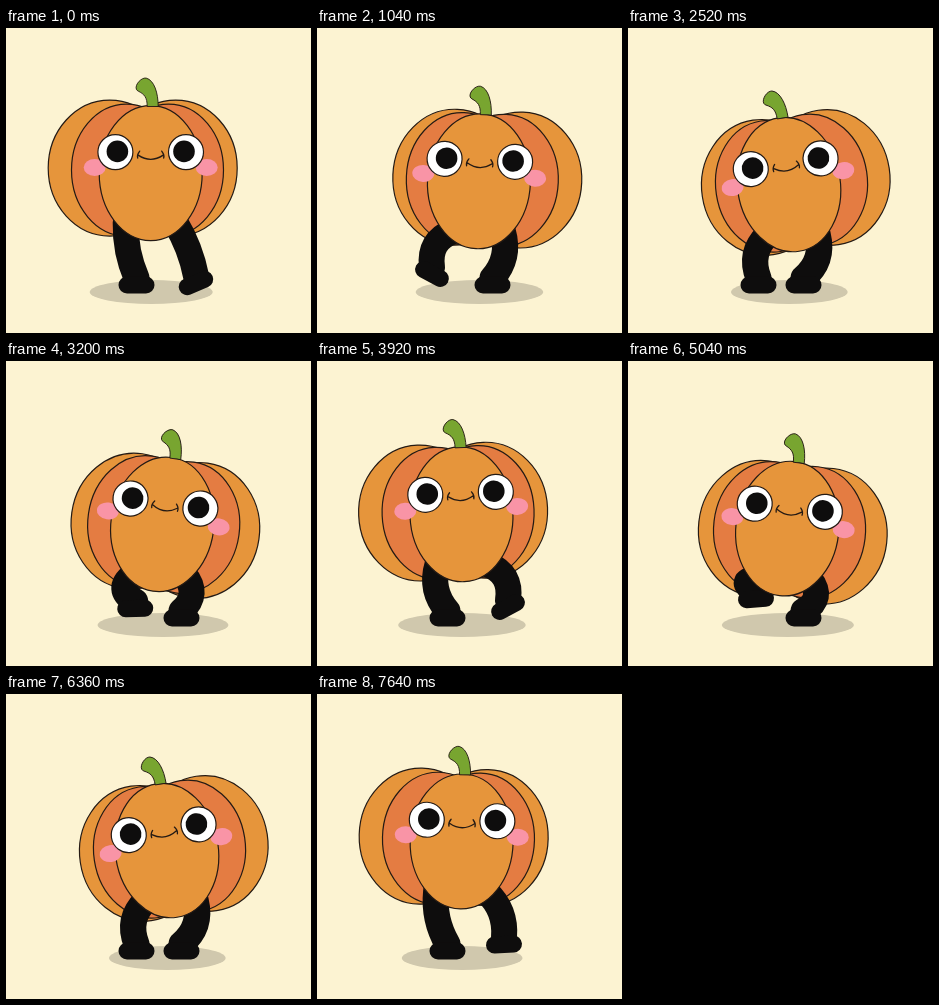
Animation of 305x305 px, one loop 7.68 s. Source, as an HTML page with a canvas:

```html
<!DOCTYPE html>
<html>
<head>
<meta charset="utf-8">
<title>Dancing pumpkin</title>
<style>
html, body { margin: 0; width: 100%; height: 100%; overflow: hidden; background: #fcf3d2; }
canvas { display: block; width: 305px; height: 305px; }
</style>
</head>
<body>
<canvas id="stage" width="305" height="305"></canvas>
<script>
const ctx = document.getElementById('stage').getContext('2d');
const STEP = 960, CYCLE = 2 * STEP, TAU = 2 * Math.PI, RAD = Math.PI / 180;
const INK = '#241a14', ORANGE = '#e6953b', RUST = '#e47c42';

// Side-to-side position over one step: -1 is left, 1 is right
const SWAY = [[0, -1], [90, -1.03], [720, 1.1], [960, 1]];
// Right foot over the cycle: time, x, y, rotation in degrees
const FOOT = [
  [0, 190, 255, -23], [80, 191, 246, -28], [240, 178, 238, 4], [400, 175.5, 257, 0],
  [1560, 175.5, 257, 0], [1720, 182, 249, 0], [1880, 187, 250.5, -3], [1920, 190, 255, -23]
];

function pose(keys, t) {
  let i = 1;
  while (i < keys.length - 1 && t > keys[i][0]) i++;
  const a = keys[i - 1], b = keys[i];
  const u = (t - a[0]) / (b[0] - a[0]);
  const e = u * u * (3 - 2 * u);
  return a.slice(1).map((v, k) => v + (b[k + 1] - v) * e);
}

function paint(fill, line = 1.2) {
  if (fill) {
    ctx.fillStyle = fill;
    ctx.fill();
  }
  if (line) {
    ctx.strokeStyle = INK;
    ctx.lineWidth = line;
    ctx.stroke();
  }
}

function oval(x, y, rx, ry, fill, line) {
  ctx.beginPath();
  ctx.ellipse(x, y, rx, ry, 0, 0, TAU);
  paint(fill, line);
}

function drawLeg(side, t, hipX, hipY) {
  const [fx, fy, deg] = pose(FOOT, side > 0 ? t : (t + STEP) % CYCLE);
  const x = side > 0 ? fx : 306 - fx;
  const ay = fy - 7;
  const dx = x - hipX, dy = ay - hipY;
  const len = Math.hypot(dx, dy);
  const bend = side * 0.4 * Math.sqrt(Math.max(0, 58 * 58 - len * len)) / len;
  ctx.strokeStyle = '#0e0d0d';
  ctx.lineCap = ctx.lineJoin = 'round';
  ctx.lineWidth = 26;
  ctx.beginPath();
  ctx.moveTo(hipX, hipY);
  ctx.quadraticCurveTo((hipX + x) / 2 + dy * bend, (hipY + ay) / 2 - dx * bend, x, ay);
  ctx.stroke();

  ctx.save();
  ctx.translate(x, fy);
  ctx.rotate(side * deg * RAD);
  ctx.lineWidth = 17;
  ctx.beginPath();
  ctx.moveTo(-9.5, 0);
  ctx.lineTo(9.5, 0);
  ctx.stroke();
  ctx.restore();
}

function inBody(x, y, tilt, drawPart) {
  ctx.save();
  ctx.translate(x, y);
  ctx.rotate(tilt);
  drawPart();
  ctx.restore();
}

// The rear lobes lag behind the front one as the pumpkin turns and nods
function drawBack(sway, nod) {
  for (const side of [-1, 1]) oval(8 * sway + side * 33, 8 * nod - 5, 61.5, 68, ORANGE);
  for (const side of [-1, 1]) oval(3.2 * sway + side * 21, 4 * nod - 3, 55, 66, RUST);
}

function drawFront(sway) {
  oval(0, 0, 51.5, 67.5, ORANGE);

  ctx.save();
  ctx.translate(2.5 + sway, 0);
  ctx.beginPath();
  ctx.moveTo(-5, -67);
  ctx.bezierCurveTo(-5, -76, -8, -79, -14, -82);
  ctx.bezierCurveTo(-20, -85, -12, -96, -6, -95);
  ctx.bezierCurveTo(2, -93, 6, -80, 6, -67);
  ctx.closePath();
  paint('#78a530', 0.9);
  ctx.restore();

  for (const side of [-1, 1]) {
    oval(side * 56, -5.5, 11, 8.5, '#f994a6', 0);
    oval(side * 35.3, -21, 17.5, 17.5, '#fff');
    oval(side * 33.3, -21.7, 10.8, 10.8, '#0e0d0d', 0);
  }

  ctx.beginPath();
  ctx.moveTo(-12.5, -18);
  ctx.quadraticCurveTo(0, -9.5, 12.5, -18);
  for (const side of [-1, 1]) {
    ctx.moveTo(side * 11, -22);
    ctx.quadraticCurveTo(side * 14, -18.5, side * 13, -15);
  }
  paint(null, 1.3);
}

function draw(t) {
  const half = t < STEP ? 1 : -1;
  const sway = half * pose(SWAY, t % STEP)[0];
  const tilt = -9.4 * RAD * Math.sin(TAU * t / CYCLE);
  const wave = Math.sin(TAU * t / STEP);
  const nod = wave * wave;
  const x = 153.2 + 8.5 * sway;
  const y = 145.1 + 21 * nod ** 0.75 + 1.5 * wave;

  ctx.fillStyle = '#fcf3d2';
  ctx.fillRect(0, 0, 305, 305);
  oval(x + 0.5, 264, 61.5 + 4.5 * wave, 12, '#d0c8ad', 0);
  inBody(x, y, tilt, () => drawBack(sway, nod));
  for (const side of [-1, 1]) drawLeg(side, t, x + side * 25 - 26 * Math.sin(tilt), y + 50);
  inBody(x, y, tilt, () => drawFront(sway));
}

const start = performance.now();
function tick() {
  const t = Math.max(0, performance.now() - start);
  draw(Math.floor(t / 40) * 40 % CYCLE);
  requestAnimationFrame(tick);
}
tick();
</script>
</body>
</html>
```
